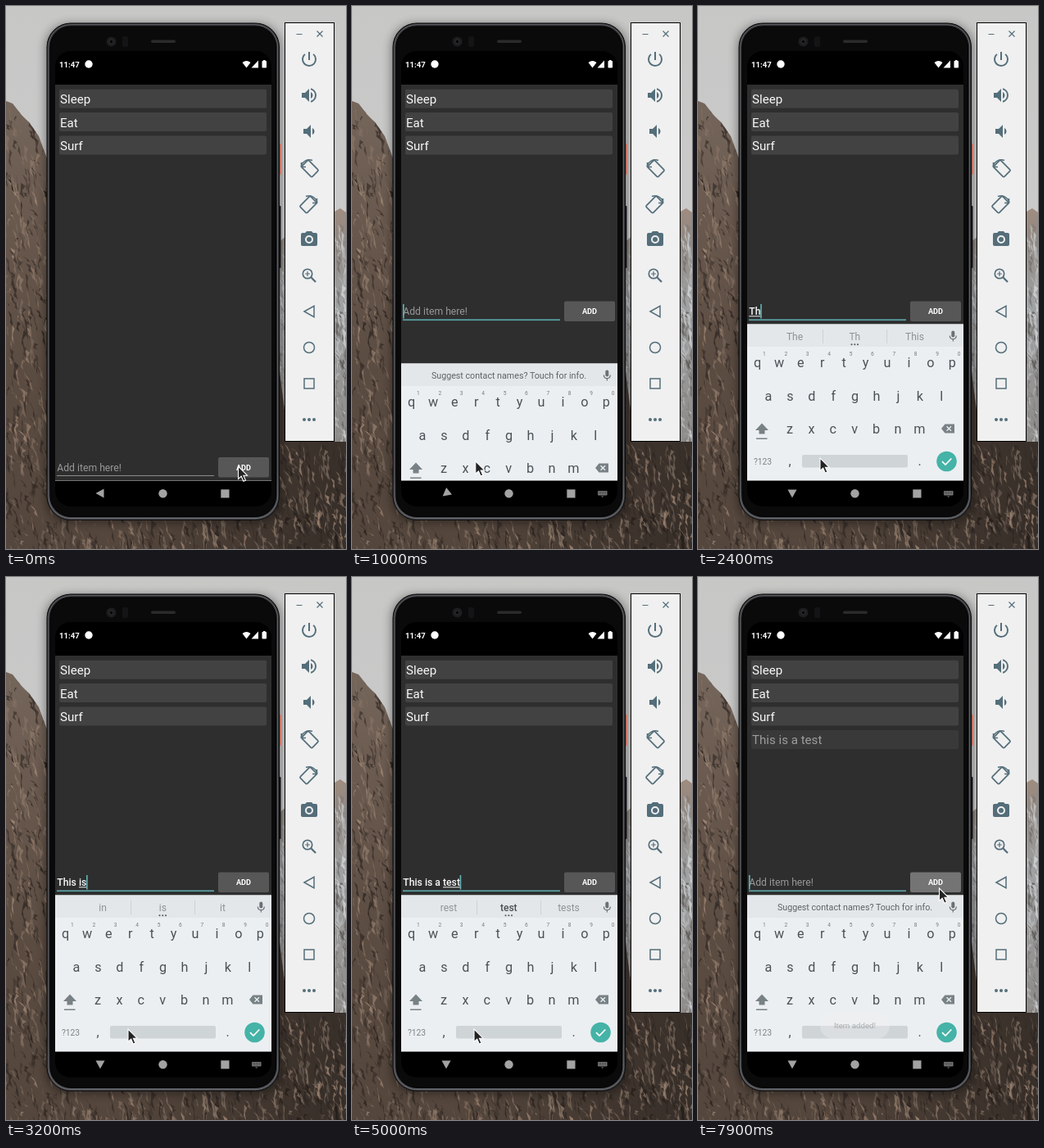
An HTML page that plays this animation: 415 by 663 pixels, repeating every 8000 ms.

```html
<!DOCTYPE html>
<html lang="en">
<head>
<meta charset="utf-8">
<title>To-do list demo</title>
<style>
html, body { margin: 0; width: 100%; height: 100%; overflow: hidden; background: #c8c8c7; }
svg { display: block; width: 415px; height: 663px; }
text { font-family: Roboto, "Open Sans", sans-serif; white-space: pre; }
</style>
</head>
<body>
<svg id="stage" viewBox="0 0 415 663" xmlns="http://www.w3.org/2000/svg">
  <defs>
    <linearGradient id="sky" x2="0" y2="1">
      <stop offset="0" stop-color="#c7c7c6"/><stop offset=".5" stop-color="#cbcbcb"/>
    </linearGradient>
    <linearGradient id="rock" gradientUnits="userSpaceOnUse" x1="0" y1="115" x2="0" y2="663">
      <stop offset="0" stop-color="#75665b"/><stop offset=".3" stop-color="#67574c"/>
      <stop offset=".6" stop-color="#5b4c42"/><stop offset="1" stop-color="#54463c"/>
    </linearGradient>
    <linearGradient id="shade" gradientUnits="userSpaceOnUse" x1="150" y1="0" x2="400" y2="0">
      <stop offset="0" stop-color="#241f1c" stop-opacity="0"/><stop offset="1" stop-color="#241f1c" stop-opacity=".6"/>
    </linearGradient>
    <linearGradient id="farRock" gradientUnits="userSpaceOnUse" x1="0" y1="245" x2="0" y2="540">
      <stop offset="0" stop-color="#a08c7f"/><stop offset=".15" stop-color="#908984"/>
      <stop offset=".4" stop-color="#a0a2a3"/><stop offset="1" stop-color="#8d8a88"/>
    </linearGradient>
    <linearGradient id="rim" x2="0" y2="1">
      <stop offset="0" stop-color="#2c2d2f"/><stop offset=".9" stop-color="#2a2b2e"/><stop offset="1" stop-color="#4a4b50"/>
    </linearGradient>
    <filter id="blur" x="-20%" y="-20%" width="140%" height="140%"><feGaussianBlur stdDeviation="6"/></filter>
    <clipPath id="nearClip"><path d="M0 116L8 119 19 133 29 143 40 159 50 186 180 400 333 440 345 532 415 532V663H0Z"/></clipPath>
    <clipPath id="farClip"><path d="M320 300L338 284 372 262 401 251 408 247 415 252V534H320Z"/></clipPath>
    <clipPath id="appClip"><path d="M60 96H324V579.5H60Z"/></clipPath>
  </defs>

  <rect width="415" height="663" fill="url(#sky)"/>
  <g id="far" clip-path="url(#farClip)"><rect width="415" height="663" fill="url(#farRock)"/></g>
  <g id="near" clip-path="url(#nearClip)">
    <rect width="415" height="663" fill="url(#rock)"/>
    <rect width="415" height="663" fill="url(#shade)"/>
  </g>

  <!-- phone body -->
  <rect x="48" y="22" width="288" height="609" rx="28" opacity=".4" filter="url(#blur)"/>
  <rect x="331" y="168" width="4.5" height="38" rx="1" fill="#d0604a"/>
  <rect x="331" y="244" width="4.5" height="76" rx="1" fill="#151517"/>
  <rect x="50" y="21" width="283.5" height="606.5" rx="29" fill="url(#rim)" stroke="#0b0b0c"/>
  <rect x="51.700" y="22.700" width="280" height="603" rx="27.500" fill="none" stroke="#6c6e72" stroke-width=".9"/>
  <rect x="54" y="25" width="275.500" height="598.500" rx="25" fill="#0a0a0b" stroke="#000"/>
  <rect x="177" y="41.500" width="30" height="3.500" rx="1.700" fill="#2b2b2c"/>
  <circle cx="128.500" cy="43.500" r="6" fill="#1d1d1f"/>
  <circle cx="128.500" cy="43.500" r="2.500" fill="#060608" stroke="#343437"/>
  <rect x="142" y="37" width="7" height="13" rx="2" fill="#141416"/>
  <rect x="60" y="55" width="264" height="556" rx="19"/>

  <!-- status bar -->
  <g fill="#fff">
    <text x="65" y="75" font-size="9.600" font-weight="700">11:47</text>
    <circle cx="101" cy="71" r="4.700"/>
    <path d="M288.500 69Q293.500 65 298.500 69L293.500 75.500Z"/>
    <path d="M308 66.500V75.500H299.500Z"/>
    <rect x="312.500" y="67" width="5.500" height="8.500" rx=".8"/><rect x="314" y="66" width="2.500" height="2"/>
  </g>

  <rect x="60" y="96" width="264" height="483.500" fill="#2e2e2e"/>
  <g id="list"></g>

  <!-- entry row, drawn at its raised place -->
  <g id="entry">
    <text id="field" x="62.300" y="377" font-size="12.2"></text>
    <rect id="mark" y="378.300" height="1" fill="#eee"/>
    <rect id="line" x="62" width="192"/>
    <rect id="caret" y="364" width="1.600" height="17.500" fill="#62b3b6"/>
    <rect id="button" x="259" y="360.500" width="62" height="24.500" rx="2"/>
    <text x="290" y="376.300" font-size="9.200" font-weight="700" fill="#fff" text-anchor="middle">ADD</text>
  </g>

  <g clip-path="url(#appClip)"><g id="keyboard">
    <rect x="60" y="388.500" width="264" height="191.500" fill="#eceff2"/>
    <rect x="60" y="388.500" width="264" height="27.500" fill="#e4e7ea"/>
    <text id="tip" x="191.500" y="407" font-size="10.700" fill="#5c6265" text-anchor="middle">Suggest contact names? Touch for info.</text>
    <g id="words"><path d="M152.500 395V412M230.500 395V412" stroke="#cdd2d5"/></g>
    <g fill="#6a7275">
      <rect x="309.300" y="396.500" width="4" height="8" rx="2"/>
      <path d="M307.300 402.500Q307.500 406.700 311.300 406.700T315.300 402.500M311.300 406.700V409.500" fill="none" stroke="#6a7275" stroke-width="1.200"/>
    </g>
    <g id="keys" fill="#4b5256" text-anchor="middle"></g>
    <path d="M78 509.500L86 518H81.500V522.500H74.500V518H70Z" fill="#788185"/>
    <rect x="71" y="527.500" width="13.500" height="1.500" fill="#788185"/>
    <path d="M297 516L301.500 510.500H313V521.500H301.500Z" fill="#788185"/>
    <path d="M303.500 513.200L309 518.800M309 513.200L303.500 518.800" stroke="#eceff2" stroke-width="1.300"/>
    <rect x="127" y="548" width="129" height="15.500" rx="2" fill="#cfd4d7"/>
    <circle cx="303.500" cy="556" r="12.300" fill="#45b3a7"/>
    <path d="M298 556.200L302 560 309.300 552.500" fill="none" stroke="#fff" stroke-width="1.700"/>
  </g></g>

  <g id="toast">
    <rect x="149" y="531.500" width="85" height="32" rx="16" fill="#f0f0f0"/>
    <text x="191.500" y="551" font-size="9.700" fill="#555" text-anchor="middle">Item added!</text>
  </g>

  <!-- navigation bar -->
  <g fill="#a3a3a3">
    <path id="back" d="M109.500 595L119.500 589.500V600.500Z"/>
    <circle cx="191.500" cy="595.300" r="5.200"/>
    <rect x="262.300" y="590.300" width="10.200" height="10.200"/>
    <g id="switcher">
      <rect x="300" y="592" width="11.500" height="5.500" rx=".7" fill="#777"/>
      <path d="M301 593.500H311M301 595.300H311" stroke="#111" stroke-width=".8" stroke-dasharray="1 1"/>
      <path d="M304 598.500H307.500L305.700 600Z" fill="#777"/>
    </g>
  </g>

  <!-- side toolbar -->
  <rect x="340.500" y="20.500" width="60" height="511" fill="#f0f0f0" stroke="#000"/>
  <g id="tools" fill="#546e7a"></g>
  <g fill="none" stroke="#546e7a" stroke-width="1.700">
    <path d="M354.500 34.500H361.500M379.500 30.500L386.500 37.500M386.500 30.500L379.500 37.500" stroke-width="1.200"/>
    <g id="turn">
      <rect x="365" y="189.500" width="12" height="18" rx="1.500" transform="rotate(-45 371 198.500)"/>
      <path d="M360 196A10.500 10.500 0 0 1 374 188.500M360.500 191V196.500H366" stroke-width="1.500"/>
    </g>
    <use href="#turn" transform="translate(740 44) scale(-1 1)"/>
    <circle cx="368" cy="327" r="5.700"/>
    <path d="M372.300 331.300L378 337" stroke-width="2.300"/>
    <path d="M365 327H371M368 324V330" stroke-width="1.200"/>
    <path d="M364 373L376 366.300V379.700Z" stroke-width="1.500"/>
    <circle cx="370" cy="417" r="6.500" stroke-width="1.500"/>
    <rect x="364" y="455" width="12" height="12" stroke-width="1.500"/>
  </g>
  <g fill="#546e7a"><circle cx="364" cy="505" r="2"/><circle cx="370" cy="505" r="2"/><circle cx="376" cy="505" r="2"/></g>

  <path id="cursor" d="M0 0V15.500L3.700 12.200 6.300 18.300 9 17.100 6.400 11.200H11Z" fill="#222" stroke="#fff" stroke-width="1.100"/>
</svg>

<script>
const LOOP = 8000, STEP = 100;
const $ = id => document.getElementById(id);

function add(parent, tag, attrs, text) {
  const node = document.createElementNS("http://www.w3.org/2000/svg", tag);
  set(node, attrs);
  if (text) node.textContent = text;
  parent.appendChild(node);
  return node;
}
function set(node, attrs) {
  for (const k in attrs) node.setAttribute(k, attrs[k]);
}
const show = (node, on) => set(node, { visibility: on ? "visible" : "hidden" });

// Rock texture: seeded random cracks and ledges inside a box
let seed = 11;
const rnd = () => (seed = (seed * 16807) % 2147483647) / 2147483647;
function crag(parent, count, left, top, width, height, tones) {
  for (let i = 0; i < count; i++) {
    const x = left + rnd() * width, y = top + rnd() * height;
    const w = 1 + rnd() * 5, h = 5 + rnd() * 22, lean = rnd() * 9 - 3;
    add(parent, "path", {
      d: `M${x} ${y}l${w} ${h * .2}l${lean - w * .4} ${h * .3}l${w * .5} ${h * .5}l${-w} ${-h * .3}l${w * .2} ${-h * .25}Z`,
      fill: tones[i % tones.length], opacity: .35 + rnd() * .45
    });
  }
}
const brown = ["#241d19", "#8f7b6b", "#342a25", "#a58b78", "#2c2522", "#7c6c60"];
const snow = ["#c9cdcf", "#5b5855", "#d3d6d7", "#77716c"];
crag($("near"), 380, -3, 116, 58, 547, brown);
crag($("near"), 260, 40, 618, 375, 45, brown);
crag($("near"), 150, 328, 530, 87, 100, brown);
crag($("far"), 110, 399, 262, 16, 270, snow);
crag($("far"), 60, 332, 300, 9, 230, snow);

// List rows
const rows = ["Sleep", "Eat", "Surf", "This is a test"].map((label, i) => {
  const g = add($("list"), "g", { transform: `translate(0 ${i * 28.4})` });
  add(g, "rect", { x: 65, y: 101.7, width: 253, height: 23, rx: 2, fill: "#424242" });
  add(g, "text", { x: 66, y: 119.3, "font-size": 15.1, fill: "#f8f8f8" }, label);
  return g;
});

// Keyboard letters
const key = (x, y, size, label, fill) =>
  add($("keys"), "text", Object.assign({ x, y, "font-size": size }, fill && { fill }), label);
[["qwertyuiop", 72.6, 441.3], ["asdfghjkl", 86, 481.7], ["zxcvbnm", 112, 521.7]].forEach(([row, x, y], r) =>
  [...row].forEach((c, i) => {
    key(x + i * 26.4, y, 16.2, c);
    if (!r) key(x + 8.3 + i * 26.4, 427.3, 6.6, String((i + 1) % 10), "#757c80");
  }));
key(79, 560, 10.3, "?123", "#7b8386");
key(112, 560.5, 16, ",");
key(270.5, 560.5, 16, ".");

const words = [118, 191.3, 264.5].map(x =>
  add($("words"), "text", { x, y: 407.5, "font-size": 12, fill: "#8c9295", "text-anchor": "middle" }));
[187.5, 191.3, 195].forEach(cx => add($("words"), "circle", { cx, cy: 413.2, r: 1, fill: "#4c5154" }));

// Toolbar icons on a 24-unit grid: centre y, path
[
  [65, "M13 3h-2v10h2V3zm4.830 2.170l-1.420 1.420C17.990 7.860 19 9.810 19 12a7 7 0 1 1-11.420-5.420L6.170 5.170A9 9 0 1 0 17.830 5.170z"],
  [109, "M3 9v6h4l5 5V4L7 9H3zm13.500 3c0-1.770-1.020-3.290-2.500-4.030v8.050c1.480-.73 2.500-2.250 2.500-4.020zM14 3.230v2.060a7 7 0 0 1 0 13.420v2.060a9 9 0 0 0 0-17.540z"],
  [153, "M18.500 12c0-1.770-1.020-3.290-2.500-4.030v8.050c1.480-.73 2.500-2.250 2.500-4.020zM5 9v6h4l5 5V4L9 9H5z"],
  [285, "M9 2L7.170 4H4a2 2 0 0 0-2 2v12a2 2 0 0 0 2 2h16a2 2 0 0 0 2-2V6a2 2 0 0 0-2-2h-3.170L15 2zM12 17a5 5 0 1 1 0-10a5 5 0 0 1 0 10zM12 15a3 3 0 1 0 0-6a3 3 0 0 0 0 6z"]
].forEach(([y, d]) =>
  add($("tools"), "path", { d, "fill-rule": "evenodd", transform: `translate(358 ${y - 12})` }));

// Typing: time, text, start of the underlined word (-1: none), suggestions
const typing = [
  [0, "", -1, ""],
  [1800, "T", -1, ""],
  [2000, "T", 0, "The T This"],
  [2300, "Th", 0, "The T This"],
  [2400, "Th", 0, "The Th This"],
  [2800, "This", 0, "The Th This"],
  [2900, "This ", -1, "The This Thus"],
  [3100, "This i", -1, ""],
  [3200, "This is", 5, "in is it"],
  [3400, "This is ", -1, "in is it"],
  [3500, "This is ", -1, ""],
  [3600, "This is a", 8, "and a as"],
  [3700, "This is a ", -1, "and a as"],
  [3900, "This is a ", -1, ""],
  [4200, "This is a t", -1, ""],
  [4300, "This is a t", 10, "to t the"],
  [4500, "This is a te", 10, "to t the"],
  [4600, "This is a te", 10, "tell te text"],
  [4700, "This is a tes", 10, "tell te text"],
  [4800, "This is a tes", 10, "rest tes test"],
  [4900, "This is a test", 10, "rest tes test"],
  [5000, "This is a test", 10, "rest test tests"],
  [7800, "", -1, ""]
];
// Caret on/off switches, starting hidden
const blinks = [800, 5500, 6000, 6500, 7000, 7500, 7700];
// Pointer tip: time, x, y
const path = [
  [0, 283.5, 562], [100, 276, 563], [500, 172, 566], [700, 153, 562], [900, 152.5, 559.5],
  [1100, 149, 552], [6700, 149, 552], [6800, 304.5, 361.5], [6900, 314, 345],
  [7000, 303, 372], [7100, 294.5, 390], [7400, 294.5, 390], [7500, 294.5, 380]
];
const slide = [[900, 191], [1000, 48], [1100, 0]];
const turn = [[900, 0], [1000, -38], [1100, -80], [1200, -87], [1300, -90]];
const itemFade = [[7700, 0], [7800, .25], [7900, .55]];
const toastFade = [[7700, 0], [7800, .12], [7900, .38]];

// Linear value from a table of [time, value...]
function at(table, t, col = 1) {
  const i = table.findIndex(k => k[0] > t);
  if (i === 0) return table[0][col];
  if (i < 0) return table[table.length - 1][col];
  const a = table[i - 1], b = table[i];
  return a[col] + (b[col] - a[col]) * (t - a[0]) / (b[0] - a[0]);
}

const pen = document.createElement("canvas").getContext("2d");
function widthOf(text) {
  pen.font = "500 12.2px Roboto, 'Open Sans', sans-serif";
  return pen.measureText(text).width;
}

function draw(t) {
  const [, text, from, list] = typing.filter(k => k[0] <= t).pop();
  const focused = t >= 800;
  const x = 62.3;

  set($("entry"), { transform: `translate(0 ${t < 900 ? 190.5 : 0})` });
  $("field").textContent = text || "Add item here!";
  set($("field"), { fill: text ? "#f8f8f8" : "#989898", "font-weight": text ? 500 : 400 });
  set($("line"), focused ? { y: 382.4, height: 1.7, fill: "#5da5a8" } : { y: 382.5, height: 1, fill: "#8c8c8c" });
  set($("button"), { fill: t >= 7700 ? "#747474" : "#575757" });

  show($("mark"), from >= 0);
  if (from >= 0) {
    const start = widthOf(text.slice(0, from));
    set($("mark"), { x: x + start, width: widthOf(text) - start });
  }
  show($("caret"), blinks.filter(b => b <= t).length % 2);
  set($("caret"), { x: x + widthOf(text) - .3 });

  show($("tip"), !list);
  show($("words"), list);
  list.split(" ").forEach((w, i) => { words[i].textContent = w; });
  const sure = t >= 5000;
  set(words[1], { "font-weight": sure ? 500 : 400, fill: sure ? "#484e51" : "#8c9295" });

  set($("keyboard"), { transform: `translate(0 ${at(slide, t)})` });
  set($("back"), { transform: `rotate(${at(turn, t)} 115 595)` });
  show($("switcher"), focused);
  set(rows[3], { opacity: at(itemFade, t) });
  set($("toast"), { opacity: at(toastFade, t) });
  set($("cursor"), { transform: `translate(${at(path, t)} ${at(path, t, 2)})` });
}

const begin = performance.now();
function tick(now) {
  const t = Math.max(0, now - begin) % LOOP;
  draw(Math.floor(t / STEP) * STEP);
  requestAnimationFrame(tick);
}
draw(0);
requestAnimationFrame(tick);
</script>
</body>
</html>
```
